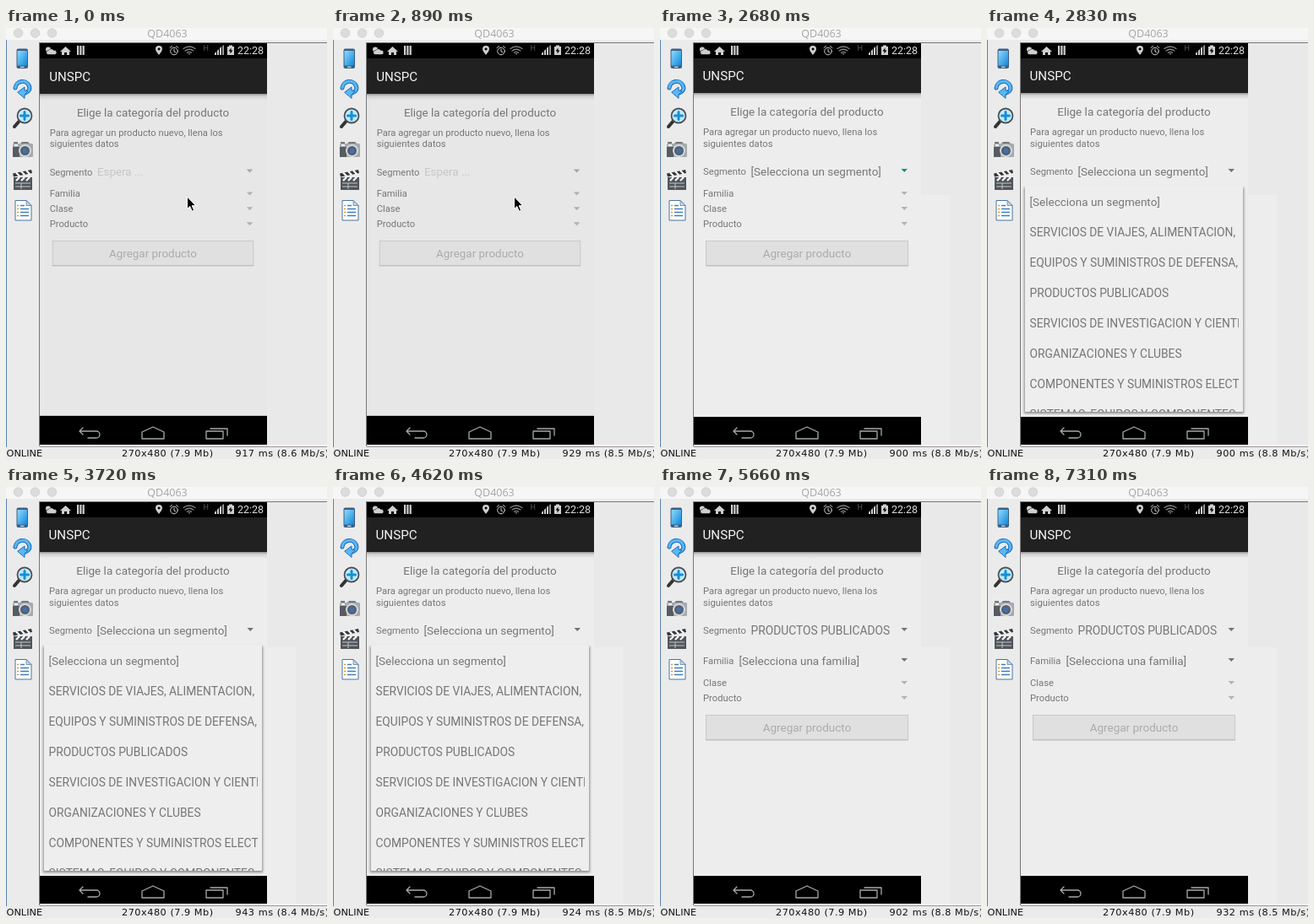
Write an HTML page that moves like this. It is 380 by 511 pixels and loops after 8000 ms.

```html
<!DOCTYPE html>
<html lang="es">
<head>
<meta charset="utf-8">
<style>
html, body { margin: 0; width: 100%; height: 100%; overflow: hidden; background: #ebebeb; }
svg { display: block; width: 380px; height: 511px; }
text { font-family: Roboto, sans-serif; fill: #767676; white-space: pre; }
.small { font-size: 11.25px; }
.mid { font-size: 13.5px; }
.caps { font-size: 13.8px; }
.info { font: 11.3px "DejaVu Sans", sans-serif; letter-spacing: .5px; fill: #111; }
.line { fill: none; stroke-linecap: round; stroke-linejoin: round; }
</style>
</head>
<body>
<svg viewBox="0 0 380 511">
  <defs>
    <linearGradient id="shade" x2="0" y2="1">
      <stop offset="0" stop-color="#8f8f8f"/><stop offset=".3" stop-color="#cdcdcd"/><stop offset="1" stop-color="#d8d8d8" stop-opacity="0"/>
    </linearGradient>
    <linearGradient id="blue" x2="1" y2="1">
      <stop offset="0" stop-color="#8fdcff"/><stop offset="1" stop-color="#1187d8"/>
    </linearGradient>
    <filter id="soft" x="-5%" y="-5%" width="110%" height="110%"><feGaussianBlur stdDeviation="1.6"/></filter>
    <clipPath id="rows"><rect x="46" y="188" width="252" height="267"/></clipPath>
    <clipPath id="screen"><rect x="40" y="36" width="269" height="458"/></clipPath>
  </defs>

  <!-- window -->
  <rect width="380" height="511" fill="#ebebeb"/>
  <rect x="309" y="18" width="71" height="476" fill="#e9e9e9"/>
  <rect id="patch" x="309" width="34" fill="#ededed"/>
  <rect width="380" height="14" fill="#f6f6f6"/>
  <g fill="#dcdcdc" stroke="#cbcbcb" stroke-width=".7">
    <circle cx="14.500" cy="6" r="5.300"/><circle cx="34.500" cy="6" r="5.300"/><circle cx="54.500" cy="6" r="5.300"/>
  </g>
  <text x="191" y="11" text-anchor="middle" style="font:12.5px 'Open Sans',sans-serif;fill:#a5a5a5">QD4063</text>
  <rect y="14" width="1" height="483" fill="#5b82b4"/>
  <rect x="39" y="17" width="341" height="1" fill="#777"/>
  <rect x="39" y="17" width="1.300" height="479" fill="#777"/>

  <!-- toolbar -->
  <g>
    <rect x="12.500" y="24.500" width="13.500" height="23.500" rx="2" fill="#3d5f83"/>
    <rect x="13.500" y="27" width="11.500" height="17.500" fill="url(#blue)"/>
    <path d="M17 46.300h4.500" stroke="#d8e6f0" stroke-width="1.200"/>
  </g>
  <g class="line">
    <path d="M11 71a8.500 8.500 0 0 1 16-3q3 6-4 9" stroke="#1769bb" stroke-width="5"/>
    <path d="M11 71a8.500 8.500 0 0 1 16-3q3 6-4 9" stroke="#58b8f4" stroke-width="3"/>
    <path d="M14 76l8-6v4l4 1-4 4v4z" fill="#58b8f4" stroke="#1769bb"/>
  </g>
  <g class="line">
    <path d="M16 110l-6 7" stroke="#333" stroke-width="4"/>
    <circle cx="22" cy="104" r="8.500" fill="#c4e9fa" stroke="#4a5157" stroke-width="1.800"/>
    <path d="M22 99.500v9M17.500 104h9" stroke="#168fd6" stroke-width="3"/>
  </g>
  <g>
    <rect x="8" y="137" width="24" height="16" rx="1.500" fill="#a5aaaf"/>
    <rect x="8" y="141" width="8" height="12" fill="#565c62"/>
    <path d="M9 137v-2h5v2zM17 137l2-2h7l2 2z" fill="#73797f"/>
    <circle cx="22.500" cy="145.500" r="7.500" fill="#d5d9dd"/><circle cx="22.500" cy="145.500" r="5.500" fill="#56606d"/>
    <circle cx="22.500" cy="145.500" r="3" fill="#456fa8"/><rect x="10" y="138" width="4" height="2" fill="#f3f3f3"/>
  </g>
  <g>
    <path d="M9 177h22v15H9z" fill="#50555a"/>
    <path d="M8 172.500l22-4.500 1 4-22 4.500z" fill="#33373b"/>
    <path d="M12 171.500l4 4M18 170l4 4M24 169l4 4M12 181l4-4M18 181l4-4M24 181l4-4" stroke="#fff" stroke-width="2.200"/>
    <path d="M11 184h18M11 188h18M18 184v7" stroke="#c4c8cb"/>
  </g>
  <g>
    <path d="M11 204.500h13l6 6v17.500H11z" fill="#fff" stroke="#47749f"/>
    <path d="M24 204.500v6h6z" fill="#c5d9ea" stroke="#47749f" stroke-width=".7"/>
    <path d="M17 210.500h5M17 214.500h10M17 218.500h10M17 222.500h10" stroke="#3c7dbc" stroke-width="1.500"/>
    <path d="M13 210.500h2M13 214.500h2M13 218.500h2M13 222.500h2" stroke="#d79a2b" stroke-width="1.500"/>
  </g>

  <!-- phone -->
  <rect x="40" y="18" width="269" height="476" fill="#000"/>
  <g fill="#cfcfcf">
    <circle cx="50" cy="25.500" r="3"/>
    <path d="M50 31.500a2.500 2.500 0 0 1 .5-5 3.500 3.500 0 0 1 6 0 2.500 2.500 0 0 1 1.500 5z" stroke="#000" stroke-width=".5"/>
    <path d="M64 28l6.500-6 6.500 6h-2v4h-3v-3h-3v3h-3v-4z"/>
    <path d="M84 21h2.200v11H84zM87.300 21h2.200v11h-2.200zM90.600 21h2.200v11h-2.200z"/>
    <path fill-rule="evenodd" d="M181 32c-2-3-4-5-4-7a4 4 0 0 1 8 0c0 2-2 4-4 7zM181 23.500a1.500 1.500 0 1 0 .1 0z"/>
    <g class="line" stroke="#cfcfcf">
      <circle cx="199" cy="27.500" r="4.300"/><path d="M199 25v3l2 1M194 23.500l2.500-2M204 23.500l-2.500-2"/>
    </g>
    <g class="line" stroke="#858585" stroke-width="1.300">
      <path d="M210 24.500q7-5 14 0M212 27q5-3.500 10 0M214.500 29.300q2.500-2 5 0"/>
    </g>
    <path d="M215.500 30h3l-1.500 2z" fill="#858585"/>
    <path d="M247 32v-2l2-2v4zM250 32v-5l2-2v7zM253 32v-8l2-2v10z"/><path d="M256 32V21.500l2-1.500v12z" fill="#999"/>
    <path fill-rule="evenodd" d="M262 22h2v-1.500h4V22h2v10h-8zM266.500 23.500l-3 4h2v3l3-4h-2z"/>
  </g>
  <text x="233.500" y="27" style="font-size:9px;fill:#555">H</text>
  <text x="274" y="31" style="font-size:12.5px;fill:#dedede">22:28</text>

  <g clip-path="url(#screen)">
    <rect id="page" x="40" y="36" width="269" height="425"/>
    <g id="app">
      <rect x="38" y="34" width="273" height="43" fill="#212121"/>
      <rect x="38" y="77" width="273" height="8" fill="url(#shade)"/>
      <rect x="38" y="461" width="273" height="36" fill="#000"/>
      <text x="50.500" y="62" style="font-size:15.2px;fill:#f4f4f4">UNSPC</text>
      <text class="mid" x="174" y="104" text-anchor="middle">Elige la categoría del producto</text>
      <text class="small" x="51" y="127.300">Para agregar un producto nuevo, llena los</text>
      <text class="small" x="51" y="140.500">siguientes datos</text>
      <text class="small" x="51" y="174.200">Segmento</text>
      <text id="seg" x="107.500" y="174.500"></text>
      <text id="famLabel" class="small" x="51">Familia</text>
      <text id="fam" class="mid" x="93.500" y="210.500">[Selecciona una familia]</text>
      <path id="arrow" d="M285.500 167h7.500l-3.750 4z"/>
      <path id="famArrow" d="M285.500 0h7.500l-3.750 4z"/>
      <g id="lower">
        <text class="small" x="51" y="217.500">Clase</text>
        <text class="small" x="51" y="235.500">Producto</text>
        <path d="M285.500 212h7.500l-3.750 4zM285.500 230h7.500l-3.750 4z" fill="#b1b1b1"/>
        <rect x="54.500" y="252.500" width="239" height="29" fill="#e0e0e0" stroke="#c8c8c8"/>
        <path d="M54 282h240" stroke="#b9b9b9"/>
        <text class="mid" x="174" y="272" text-anchor="middle" style="fill:#ababab">Agregar producto</text>
      </g>
    </g>
  </g>
  <g class="line" stroke="#a8a8a8" stroke-width="1.300">
    <path d="M91 474l-4 4 4 4M87 478h20a4 4 0 0 1 0 8h-10"/>
    <path d="M161 479l13-6 13 6v8h-26z"/>
    <path d="M237 478h20v9h-20zM242 475h20v8"/>
  </g>

  <g id="popup">
    <rect x="44" y="189" width="260" height="268" fill="#555" opacity=".65" filter="url(#soft)"/>
    <rect x="45" y="187" width="258" height="268" rx="1" fill="#eee"/>
    <g id="list" clip-path="url(#rows)"></g>
  </g>

  <rect x="40" y="494" width="340" height="2" fill="#faf5f9"/>
  <rect x="40" y="496" width="340" height="1" fill="#9a959a"/>
  <text class="info" x="0.500" y="508" style="letter-spacing:0">ONLINE</text>
  <text class="info" x="137" y="508">270x480 (7.9 Mb)</text>
  <text id="rate" class="info" x="271.500" y="508"></text>

  <path id="cursor" d="M214.500 200v14.500l3.300-3 2.500 5.700 2.400-1-2.500-5.500h4.500z" fill="#000" stroke="#fff" stroke-width="1"/>
</svg>
<script>
const $ = id => document.getElementById(id);
const set = (id, attrs) => {
  for (const k in attrs) $(id).setAttribute(k, attrs[k]);
};
const show = (id, on) => set(id, { visibility: on ? "visible" : "hidden" });

const prompt1 = "[Selecciona un segmento]";
const rows = [
  prompt1,
  "SERVICIOS DE VIAJES, ALIMENTACION,",
  "EQUIPOS Y SUMINISTROS DE DEFENSA,",
  "PRODUCTOS PUBLICADOS",
  "SERVICIOS DE INVESTIGACION Y CIENTIFICOS",
  "ORGANIZACIONES Y CLUBES",
  "COMPONENTES Y SUMINISTROS ELECTRONICOS",
  "SISTEMAS, EQUIPOS Y COMPONENTES"
];
rows.forEach((label, i) => {
  const row = document.createElementNS("http://www.w3.org/2000/svg", "text");
  row.setAttribute("x", 50.5);
  row.setAttribute("y", 210.8 + 36 * i);
  row.setAttribute("class", i ? "caps" : "mid");
  row.textContent = label;
  $("list").append(row);
});

// start time, frame delay in ms
const rates = [[0, 917], [890, 929], [1790, 921], [2680, 900], [3720, 943],
  [4620, 924], [5510, 902], [6410, 885], [7310, 932]];

function draw(t) {
  const loading = t < 1040, chosen = t >= 5660;
  const pressed = t >= 1930 && t < 2830;

  set("page", { fill: loading ? "#e7e7e7" : "#ededed" });
  set("app", { transform: loading ? "translate(174 265) scale(.994) translate(-174 -265)" : "" });

  $("seg").textContent = loading ? "Espera ..." : chosen ? rows[3] : prompt1;
  set("seg", { class: chosen ? "caps" : "mid" });
  $("seg").style.fill = loading ? "#c6c6c6" : "";
  set("arrow", { fill: loading ? "#a6a6a6" : pressed ? "#129085" : "#737373" });

  set("famLabel", { y: chosen ? 210.2 : 199.5 });
  set("famArrow", { transform: `translate(0 ${chosen ? 203 : 194})`, fill: chosen ? "#737373" : "#b1b1b1" });
  show("fam", chosen);
  set("lower", { transform: `translate(0 ${chosen ? 18 : 0})` });

  show("popup", t >= 2830 && !chosen);
  show("cursor", t < 2680);
  set("cursor", { transform: `translate(${t < 2530 ? 0 : 1} 0)` });

  const top = t < 3720 ? 198 : 190;
  show("patch", t >= 2680);
  set("patch", { y: top, height: 494 - top });

  const ms = rates.filter(r => r[0] <= t).pop()[1];
  $("rate").textContent = `${ms} ms (${(7900 / ms).toFixed(1)} Mb/s)`;
}

const start = performance.now();
function tick() {
  draw((performance.now() - start) % 8000);
  requestAnimationFrame(tick);
}
tick();
</script>
</body>
</html>
```
